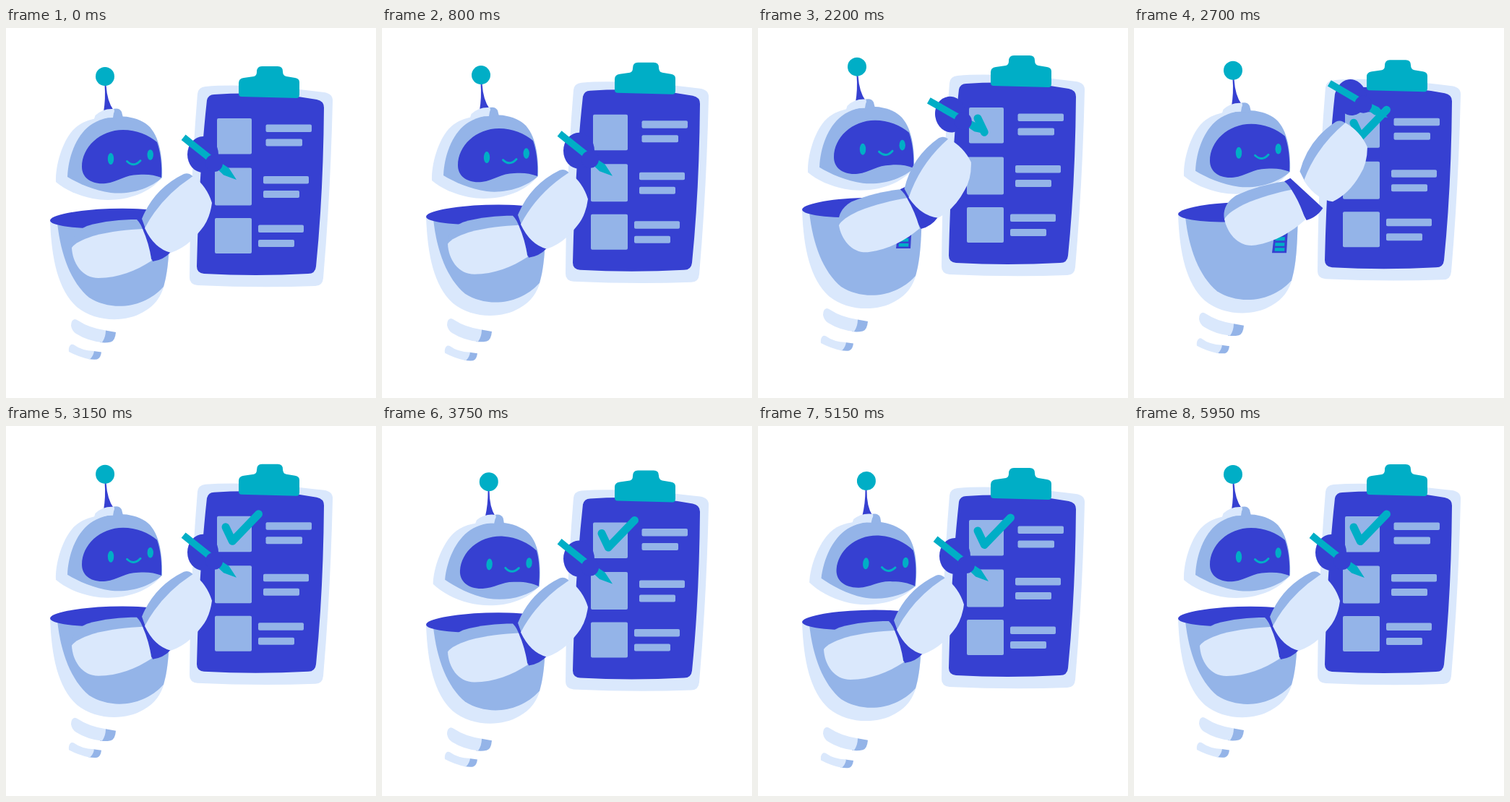
An HTML page for the animation above (6000 ms loop, 512 px wide and 512 px high).

```html
<!DOCTYPE html>
<html lang="en">
<head>
<meta charset="utf-8">
<title>Robot with checklist</title>
<style>
  html, body { margin: 0; width: 100%; height: 100%; overflow: hidden; background: #fff; }
  svg { display: block; width: 100vw; height: 100vh; }
  .light { fill: #dae8fc; }
  .mid { fill: #94b4e8; }
  .dark { fill: #3640d1; }
  .teal { fill: #00aec6; }
  .line { fill: none; stroke: #00aec6; stroke-linecap: round; stroke-linejoin: round; }
</style>
</head>
<body>
<svg viewBox="0 0 512 512">
  <g id="board">
    <path class="light" d="M276 81Q335 76 440 89Q453 91 452 102Q449 230 439 346Q438 357 428 357Q350 360 265 356Q254 355 254 345Q255 210 265 91Q266 82 276 81Z"/>
    <path class="dark" d="M288 92Q365 87 430 99Q440 101 440 110Q439 230 429 330Q428 340 418 340Q345 344 274 340Q264 339 264 330Q267 200 278 100Q280 92 288 92Z"/>
    <path class="teal" d="M326 95Q322 95 322 91V76Q322 70 329 69L343 67Q347 66 347 61Q347 53 354 53H376Q383 53 383 60Q383 66 388 67L400 69Q406 70 406 75V92Q406 97 402 97Z"/>
    <g class="mid">
      <rect x="292" y="125" width="48" height="49.5" rx="2"/>
      <rect x="289" y="193.5" width="51" height="52" rx="2"/>
      <rect x="289" y="263" width="51" height="49" rx="2"/>
      <rect x="359.5" y="133.5" width="63.5" height="10.5" rx="2"/>
      <rect x="359.5" y="153.5" width="50.5" height="10" rx="2"/>
      <rect x="356" y="205" width="63" height="10.5" rx="2"/>
      <rect x="356" y="225" width="50" height="10" rx="2"/>
      <rect x="349" y="272.5" width="63" height="10.5" rx="2"/>
      <rect x="349" y="293" width="50" height="10" rx="2"/>
    </g>
    <path id="check" class="line" stroke-width="11" pathLength="1" stroke-dasharray="1 2" d="M304 140L313.3 159.5L349.5 122"/>
  </g>

  <g id="tail1">
    <path class="mid" d="M138 418.500L152 421Q151 433 145 434.500Q138 436 130 435Z"/>
    <path class="light" d="M95 403Q90 404 90 412Q91 419 97 423Q113 433 133 435Q138 428 138 418.500Q115 415 100 405Q97 403 95 403Z"/>
  </g>
  <g id="tail2">
    <path class="mid" d="M121 447L132 448.500Q131 457 126 458.500Q121 459 114 458Z"/>
    <path class="light" d="M90 438Q86 441 87 448Q100 455 116 458.500Q121 454 122 447Q104 446 95 439Q92 437 90 438Z"/>
  </g>

  <g id="body">
    <path class="light" d="M61 267C63 320 72 362 98 386C123 407 165 408 190 393C206 384 215 372 219 355C224 337 226 315 227 262Z"/>
    <path class="mid" d="M71 270C76 315 90 352 115 373C145 392 190 389 218 358C224 337 226 315 227 262Z"/>
    <ellipse class="dark" cx="144" cy="263.500" rx="83" ry="13.500" transform="rotate(-2 144 263.500)"/>
    <path class="dark" d="M195 286H213L211 320H191Z"/>
    <path class="teal" d="M197 289h13l-.4 6h-13zM196 298h13l-.4 5h-13zM195.500 306h13l-.4 4.500h-13zM195 313h13.500l-.4 4.500h-13.500z"/>
  </g>

  <g id="head">
    <path class="dark" d="M135 116Q138 98 136.500 79H138.500Q140 102 149 114Z"/>
    <circle class="teal" cx="137" cy="67" r="13"/>
    <path class="light" d="M69 213C68 190 78 158 92 142C104 129 120 124 145 123L216 206C195 235 150 242 120 236C100 232 82 224 69 213Z"/>
    <path class="mid" d="M85 206C86 180 96 150 116 135C138 119 172 118 193 132C211 144 217 175 216 207C200 222 172 231 145 228C122 225 100 215 85 206Z"/>
    <path class="mid" d="M146 113Q156 109 160 116L162 124L146 126Z"/>
    <path class="light" d="M121 129L123.500 121Q134 111 149 112Q151 114 149 118L148 124Q133 124 121 129Z"/>
    <path class="dark" d="M105 192C105 165 130 141 162 141C180 141 198 148 209 158C214 172 216 190 215 207C205 203 195 202 183 203C165 203 155 213 138 215C118 217 105 207 105 192Z"/>
    <ellipse class="teal" cx="145" cy="181" rx="4.200" ry="8"/>
    <ellipse class="teal" cx="199.700" cy="175.500" rx="4.200" ry="7.300"/>
    <path class="line" stroke-width="3" d="M167.500 184.500Q177 193.500 186 183.500"/>
  </g>

  <g id="arm">
    <g id="hand">
      <ellipse class="dark" cx="272.500" cy="175" rx="21.500" ry="25"/>
      <g transform="translate(319 210) rotate(38.500)">
        <rect class="teal" x="-94" y="-5" width="54" height="9.500"/>
        <path class="teal" d="M-36-4.500L-18-6L0 0L-18 6L-36 4.500Z"/>
      </g>
      <circle class="dark" cx="288" cy="187" r="12"/>
    </g>
    <g id="upper">
      <path class="dark" d="M181 265L190 262L228 310Q218 321 203 323Z"/>
      <path class="mid" d="M91 305C90 291 98 280 112 274C135 267 160 265 181 265Q187 271 190 281L120 300Z"/>
      <path class="light" d="M91 304C95 298 105 293 120 288C145 281 170 279 189 278Q198 298 201.500 322C180 336 155 346 128 346C105 346 92 325 91 304Z"/>
    </g>
    <g id="fore">
      <path class="mid" d="M188 264Q205 222 246 202Q254 199 260 207L215 245L193 278Z"/>
      <path class="light" d="M259 205Q278 219 285 242Q282 265 270 279Q252 303 228 311Q205 305 192 277Q215 233 259 205Z"/>
    </g>
  </g>
</svg>
<script>
const LOOP = 6000, STEP = 50;
const el = id => document.getElementById(id);

// Each key is [time, ...values]; values ease smoothly between neighbours.
function ease(keys, t) {
  const i = keys.findIndex(k => k[0] > t);
  if (i < 0) return keys[keys.length - 1].slice(1);
  if (i === 0) return keys[0].slice(1);
  const a = keys[i - 1], b = keys[i];
  const u = (t - a[0]) / (b[0] - a[0]), s = u * u * (3 - 2 * u);
  return a.slice(1).map((v, j) => v + (b[j + 1] - v) * s);
}

const bob = [[0, 0], [2050, -15.5], [3950, 9.3], [4350, 9.4], [6000, 0]];
const tail1 = [[0, 0], [500, .3], [2150, -15], [4300, 20], [4650, 20], [6000, 0]];
const tail2 = [[0, 0], [700, 2], [2250, -12], [4350, 19.2], [4750, 19.2], [6000, 0]];
const nod = [[0, 0], [400, 0], [2100, -13.5], [4200, 13], [4600, 13], [6000, 0]];
const tilt = [[3100, 0], [4200, 5.7], [4800, 5.7], [5900, 0]];
const tick = [[1600, 0], [2200, .29], [2600, 1]];

// Rest, start of tick, its corner, its end, rest: [dx, dy, angle]
const times = [900, 1600, 2200, 2600, 3100], rest = [0, 0, 0];
const limb = (id, pivot, ...poses) => ({
  id, pivot, keys: [rest, ...poses, rest].map((p, i) => [times[i], ...p])
});
const limbs = [
  limb('hand', '319 210', [-10, -67, -10], [-1, -48, -9], [36, -86, -9]),
  limb('upper', '148 308', [14, -38, -10], [21, -23, -7], [38, -44, -10]),
  limb('fore', '237 258', [3.5, -52, -9], [13, -34, -9], [45, -70, -8])
];

function place(id, x, y, angle = 0, pivot = '0 0') {
  el(id).setAttribute('transform', `translate(${x} ${y}) rotate(${angle} ${pivot})`);
}

function draw(t) {
  const [y] = ease(bob, t);
  for (const id of ['board', 'body', 'arm']) place(id, 0, y);
  place('tail1', 0, ease(tail1, t)[0]);
  place('tail2', 0, ease(tail2, t)[0]);
  place('head', 0, ease(nod, t)[0], ease(tilt, t)[0], '137 238');
  for (const { id, pivot, keys } of limbs) place(id, ...ease(keys, t), pivot);
  const check = el('check');
  check.style.visibility = t > 1600 ? 'visible' : 'hidden';
  check.setAttribute('stroke-dashoffset', 1 - ease(tick, t)[0]);
}

const start = performance.now();
function frame() {
  const t = (performance.now() - start) % LOOP;
  draw(Math.floor(t / STEP) * STEP);
  requestAnimationFrame(frame);
}
frame();
</script>
</body>
</html>
```
